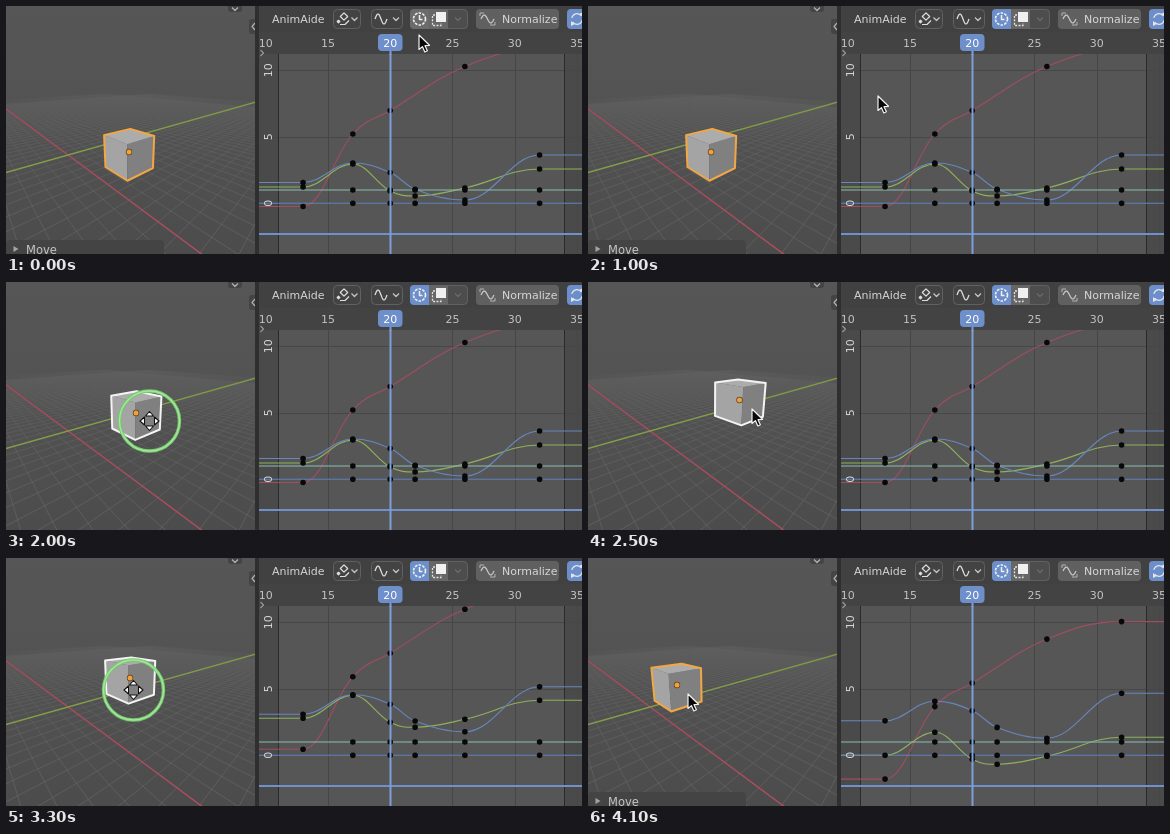
These frames come from a looping animation (576x248 px, 4.2 s). An HTML page with a canvas:

```html
<!DOCTYPE html>
<html lang="en">
<head>
<meta charset="utf-8">
<title>Animation offset</title>
<style>
html, body { margin: 0; width: 576px; height: 248px; overflow: hidden; background: #484848; }
canvas { display: block; }
</style>
</head>
<body>
<canvas id="stage" width="576" height="248"></canvas>
<script>
const W = 576, H = 248, LOOP = 4200, STEP = 100;
const ctx = document.getElementById('stage').getContext('2d');

// Motion keys: [time, x, y]
const pivotKeys = [[0, 123, 146], [1500, 123, 146], [2000, 130, 131], [2400, 151.5, 118],
  [3000, 151.5, 118], [3300, 124, 120], [3700, 89, 127]];
const pointerKeys = [[0, 413, 29], [300, 414, 10], [700, 414, 10], [1000, 290, 90], [1400, 135, 155],
  [1500, 135, 155], [2000, 143.5, 139], [2400, 164, 127], [2600, 164, 127], [2900, 155, 130],
  [3000, 155, 130], [3300, 127.5, 132], [3700, 93, 139], [3800, 93, 139], [4000, 100, 136]];

function sample(keys, t) {
  const i = keys.findIndex(k => k[0] > t);
  if (i < 0) return keys[keys.length - 1].slice(1);
  const a = keys[i - 1], b = keys[i], u = (t - a[0]) / (b[0] - a[0]);
  return [a[1] + (b[1] - a[1]) * u, a[2] + (b[2] - a[2]) * u];
}

const within = (t, a, b) => t >= a && t < b;

// Drawing helpers
function path(points, closed) {
  ctx.beginPath();
  points.forEach(p => ctx.lineTo(p[0], p[1]));
  if (closed) ctx.closePath();
}
function stroke(color, width = 1) {
  ctx.strokeStyle = color;
  ctx.lineWidth = width;
  ctx.stroke();
}
function line(points, color, width) {
  path(points);
  stroke(color, width);
}
function shape(points, fill, edge, width) {
  path(points, true);
  if (fill) { ctx.fillStyle = fill; ctx.fill(); }
  if (edge) stroke(edge, width);
}
function rect(x, y, w, h, fill, radius = 0) {
  ctx.beginPath();
  ctx.roundRect(x, y, w, h, radius);
  ctx.fillStyle = fill;
  ctx.fill();
}
function button(x, w, fill, radius = 4) {
  rect(x, 3, w, 20, fill, radius);
  ctx.beginPath();
  ctx.roundRect(x + 0.5, 3.5, w - 1, 19, radius);
  stroke('#616161');
}
function disc(x, y, r, fill) {
  ctx.beginPath();
  ctx.arc(x, y, r, 0, 7);
  ctx.fillStyle = fill;
  ctx.fill();
}
function ring(x, y, r, color, width) {
  ctx.beginPath();
  ctx.arc(x, y, r, 0, 7);
  stroke(color, width);
}
function text(s, x, y, { color = '#d6d6d6', size = 11, align = 'left' } = {}) {
  ctx.font = `${size}px "DejaVu Sans", sans-serif`;
  ctx.textAlign = align;
  ctx.fillStyle = color;
  ctx.fillText(s, x, y);
}
function chevron(x, y, color = '#c4c4c4') {
  line([[x - 3, y - 1.5], [x, y + 1.5], [x + 3, y - 1.5]], color, 1.3);
}
function clipped(x, y, w, h, draw) {
  ctx.save();
  ctx.beginPath();
  ctx.rect(x, y, w, h);
  ctx.clip();
  draw();
  ctx.restore();
}

// Perspective camera
const FOCAL = 173, CX = 124.5, CY = 124;
const YAW = 42 * Math.PI / 180, PITCH = 15.8 * Math.PI / 180;
const SY = Math.sin(YAW), CYAW = Math.cos(YAW), SP = Math.sin(PITCH), CP = Math.cos(PITCH);

// World direction to camera space: [right, up, depth]
function rotate(x, y, z) {
  const side = x * SY + y * CYAW, ahead = y * SY - x * CYAW;
  return [side, ahead * SP + z * CP, ahead * CP - z * SP];
}
function toCamera(x, y, z) {
  const ahead = 13.9, drop = -6.19, [r, u, d] = rotate(x, y, z);
  return [r - 5.43, u + ahead * SP + drop * CP, d + ahead * CP - drop * SP];
}
const project = ([r, u, d]) => [CX + FOCAL * r / d, CY - FOCAL * u / d];

function groundLine(x0, y0, x1, y1, color, width) {
  let a = toCamera(x0, y0, 0), b = toCamera(x1, y1, 0);
  const near = 0.5;
  if (a[2] < near && b[2] < near) return;
  if (a[2] > b[2]) [a, b] = [b, a];
  if (a[2] < near) {
    const u = (near - a[2]) / (b[2] - a[2]);
    a = a.map((v, i) => v + (b[i] - v) * u);
  }
  line([project(a), project(b)], color, width);
}

function vertical(stops) {
  const g = ctx.createLinearGradient(0, 0, 0, H);
  stops.forEach(([y, c]) => g.addColorStop(y / H, c));
  return g;
}

function drawCube([px, py], moving) {
  const depth = 10.02;
  const center = [(px - CX) * depth / FOCAL, (CY - py) * depth / FOCAL, depth];
  const corner = (...p) => project(rotate(...p).map((v, i) => v + center[i]));
  const front = corner(1, -1, 1), frontLow = corner(1, -1, -1);
  const left = corner(-1, -1, 1), leftLow = corner(-1, -1, -1);
  const right = corner(1, 1, 1), rightLow = corner(1, 1, -1), back = corner(-1, 1, 1);
  ctx.lineJoin = 'round';
  shape([left, front, frontLow, leftLow], '#a4a4a4');
  shape([front, right, rightLow, frontLow], '#808080');
  shape([left, back, right, front], '#acacac');
  shape([left, back, right, rightLow, frontLow, leftLow], null, moving ? '#f4f4f4' : '#f2a743', 2);
  disc(px, py, 3.2, '#54411f');
  disc(px, py, 2.5, '#f3a03a');
}

function drawViewport(t) {
  rect(0, 0, 250, H, vertical([[0, '#565656'], [75, '#545454'], [H, '#4c4c4c']]));
  const grid = vertical([[74, 'rgba(100,100,100,0)'], [120, 'rgba(100,100,100,.5)'], [H, 'rgba(102,102,102,.75)']]);
  for (let i = -45; i <= 45; i++) {
    if (!i) continue;
    groundLine(i, -60, i, 60, grid, 0.9);
    groundLine(-60, i, 60, i, grid, 0.9);
  }
  groundLine(-60, 0, 60, 0, vertical([[78, 'rgba(168,70,88,0)'], [102, '#a2495b'], [H, '#b04c60']]), 1.4);
  groundLine(0, -60, 0, 60, vertical([[78, 'rgba(128,158,66,0)'], [95, '#7f9847'], [H, '#8aa64a']]), 1.4);

  const moving = within(t, 1600, 2600) || within(t, 3100, 3800);
  drawCube(sample(pivotKeys, t), moving);

  rect(222, -4, 14, 10, '#444', 3);
  chevron(229, 3, '#b0b0b0');
  rect(243, 13, 10, 15, '#444', 3);
  line([[249, 17], [246, 20.5], [249, 24]], '#b0b0b0', 1.2);

  if (t < 1500 || within(t, 2600, 3100) || t >= 3800) {
    rect(0, 234, 158, 20, '#444', 4);
    shape([[7.5, 240], [12.5, 243], [7.5, 246]], '#a4a4a4');
    text('Move', 20, 247.5, { size: 11.5, color: '#c4c4c4' });
  }
}

// Graph editor
const frameX = f => 384.2 + (f - 20) * 12.45;
const valueY = v => 197.3 - v * 13.3;
const keyFrames = [13, 17, 20, 22, 26, 32];
const channels = [
  { color: '#a04d5f', frames: [13, 17, 20, 26, 32], ys: [200.5, 128, 104.5, 60.5, 43], shift: [0, -9.3, 20.6] },
  { color: '#8fb05a', frames: keyFrames, ys: [181, 158, 185, 190, 182, 163], shift: [0, -20.7, 16.3] },
  { color: '#6786bd', frames: keyFrames, ys: [176.5, 157, 166.5, 183.2, 194, 149], shift: [0, -20.2, -13.8] },
  { color: '#8abbb0', frames: keyFrames.slice(1), ys: Array(5).fill(184), shift: [0, 0, 0] },
  { color: '#6284c0', frames: keyFrames.slice(1), ys: Array(5).fill(197.3), shift: [0, 0, 0] }
];

function slope(p, i) {
  const a = p[i - 1], b = p[i], c = p[i + 1];
  if (!a || !c || (b[1] - a[1]) * (c[1] - b[1]) <= 0) return 0;
  return (c[1] - a[1]) / (c[0] - a[0]);
}

function drawChannel(points, color) {
  ctx.beginPath();
  ctx.moveTo(253, points[0][1]);
  ctx.lineTo(...points[0]);
  for (let i = 1; i < points.length; i++) {
    const [x0, y0] = points[i - 1], [x1, y1] = points[i], h = (x1 - x0) * 0.39;
    ctx.bezierCurveTo(x0 + h, y0 + h * slope(points, i - 1), x1 - h, y1 - h * slope(points, i), x1, y1);
  }
  ctx.lineTo(W, points[points.length - 1][1]);
  stroke(color, 1.1);
}

function drawGraph(t) {
  const stage = t < 2600 ? 0 : t < 3800 ? 1 : 2;
  rect(253, 0, 323, H, '#4a4a4a');
  rect(272, 48, 286, H, '#565656');
  for (let f = 15; f <= 35; f += 5) rect(Math.round(frameX(f)), 48, 1, H, '#464646');
  for (const v of [0, 5, 10]) rect(253, Math.round(valueY(v)), 323, 1, '#474747');
  rect(272, 48, 1, H, '#2a2a2a');
  rect(558, 48, 1, H, '#2a2a2a');

  clipped(253, 48, 323, 200, () => {
    const plots = channels.map(c => c.frames.map((f, i) => [frameX(f), c.ys[i] + c.shift[stage]]));
    plots.forEach((p, i) => drawChannel(p, channels[i].color));
    plots.flat().forEach(([x, y]) => disc(x, y, 2.8, '#080808'));
    rect(253, 227, 323, 2, '#7090cb');
    rect(383.5, 45, 2, H, '#7d9edb');
  });

  for (const v of [0, 5, 10]) {
    ctx.save();
    ctx.translate(265.5, valueY(v));
    ctx.rotate(-Math.PI / 2);
    text(v, 0, 0, { align: 'center' });
    ctx.restore();
  }

  rect(253, 26, 323, 22, '#434343');
  for (let f = 10; f <= 35; f += 5) {
    if (f !== 20) text(f, frameX(f), 41, { align: 'center', color: '#c2c2c2' });
  }
  rect(383.5, 44, 2, 5, '#7d9edb');
  rect(372, 28, 24.5, 17, '#6e8fca', 4);
  text('20', 384.2, 41, { align: 'center', color: '#fff' });
  line([[254.5, 44], [257.5, 47], [254.5, 50]], '#999', 1.1);
}

function wave(x, y, w, h, color = '#dedede') {
  ctx.beginPath();
  for (let i = 0; i <= 20; i++) ctx.lineTo(x + w * i / 20, y - h * Math.sin(i / 20 * Math.PI * 2));
  stroke(color, 1.3);
}
const diamond = (x, y, r, fill) =>
  shape([[x, y - r], [x + r, y], [x, y + r], [x - r, y]], fill, '#dedede', 1.2);

function drawHeader(t) {
  rect(253, 0, 323, 26, '#414141');
  text('AnimAide', 266, 17);

  button(327, 28, '#434343');
  diamond(338, 10.5, 3.7);
  diamond(332.5, 15.5, 1.3, '#dedede');
  line([[334, 18.5], [339, 18.5], [343, 14.5]], '#dedede', 1.2);
  chevron(348.5, 13);

  button(365, 32, '#434343');
  wave(369, 13, 12, 5);
  chevron(390, 13);

  button(404, 58, '#4d4d4d');
  rect(404, 3, 19, 20, t < 400 ? '#6b6b6b' : '#6c8fcb', [4, 0, 0, 4]);
  rect(423, 3, 19, 20, '#666');
  ctx.setLineDash([2.6, 1.2]);
  ring(413.5, 13, 6, '#f0f0f0', 1.6);
  ctx.setLineDash([]);
  line([[413.5, 9], [413.5, 13.5], [416.5, 13.5]], '#f0f0f0', 1.5);
  rect(430, 6, 10, 10, '#f0f0f0');
  ctx.setLineDash([2, 1.4]);
  line([[429, 9], [426.5, 9], [426.5, 19.5], [435, 19.5], [435, 17]], '#e2e2e2', 1.3);
  ctx.setLineDash([]);
  chevron(452, 13, '#6a6a6a');

  button(470, 83, '#606060');
  line([[474, 10], [474, 7], [478, 7]], '#b4b4b4', 1);
  line([[484, 19], [489, 19], [489, 16]], '#b4b4b4', 1);
  wave(475, 13, 13, 4, '#c8c8c8');
  text('Normalize', 496, 17);

  rect(561, 3, 20, 20, '#6c8fcb', 4);
  for (const a of [0.2, 3.34]) {
    ctx.beginPath();
    ctx.arc(571, 13, 5.3, a, a + 2.3);
    stroke('#e4e4e4', 1.3);
  }
  shape([[573, 8], [577, 11], [577, 6]], '#e4e4e4');
  shape([[569, 18], [565, 15], [565, 20]], '#e4e4e4');
}

// Pointer shapes
function drawArrow(x, y) {
  const outline = [[0, 0], [0, 14.5], [3.4, 11.6], [5.8, 17], [8.4, 15.8], [6, 10.7], [10.5, 10.3]];
  ctx.lineJoin = 'round';
  shape(outline.map(([a, b]) => [x + a, y + b]), '#080808', '#f2f2f2', 1.2);
}
function drawMoveCross(x, y) {
  for (let i = 0; i < 4; i++) {
    ctx.save();
    ctx.translate(x, y);
    ctx.rotate(i * Math.PI / 2);
    shape([[0, -9.5], [4, -5], [-4, -5]], '#fff', '#111', 1.1);
    ctx.restore();
  }
}
function drawHourglass(x, y) {
  const glass = [[-5, -7], [5, -7], [4.5, -3.5], [1.2, 0], [4.5, 3.5], [5, 7],
    [-5, 7], [-4.5, 3.5], [-1.2, 0], [-4.5, -3.5]].map(([a, b]) => [x + a, y + b]);
  shape(glass, null, '#f4f4f4', 3);
  shape(glass, '#f4f4f4', '#0a0a0a', 1.5);
  shape([[x - 3, y - 3.5], [x + 3, y - 3.5], [x, y]], '#0a0a0a');
  shape([[x - 3.5, y + 6], [x, y + 3], [x + 3.5, y + 6]], '#0a0a0a');
}

function drawPointer(t) {
  const [x, y] = sample(pointerKeys, t);
  const press = within(t, 1400, 2400) ? 1400 : within(t, 3000, 3700) ? 3000 : null;
  if (press !== null) {
    const r = Math.min(30, 11 + (t - press) / 10);
    ring(x, y, r, '#76c96e', 3.4);
    ring(x, y, r, '#a3e89a', 1.4);
  }
  if (within(t, 400, 700)) drawHourglass(414.5, 17);
  else if (within(t, 1600, 2400) || within(t, 3100, 3700)) drawMoveCross(x, y);
  else drawArrow(x, y);
}

function render(now) {
  const t = Math.floor(now % LOOP / STEP) * STEP;
  ctx.clearRect(0, 0, W, H);
  clipped(0, 0, 250, H, () => drawViewport(t));
  rect(249, 0, 4, H, '#2f2f2f');
  drawGraph(t);
  drawHeader(t);
  drawPointer(t);
}

const start = performance.now();
function tick() {
  render(performance.now() - start);
  requestAnimationFrame(tick);
}
tick();
</script>
</body>
</html>
```
